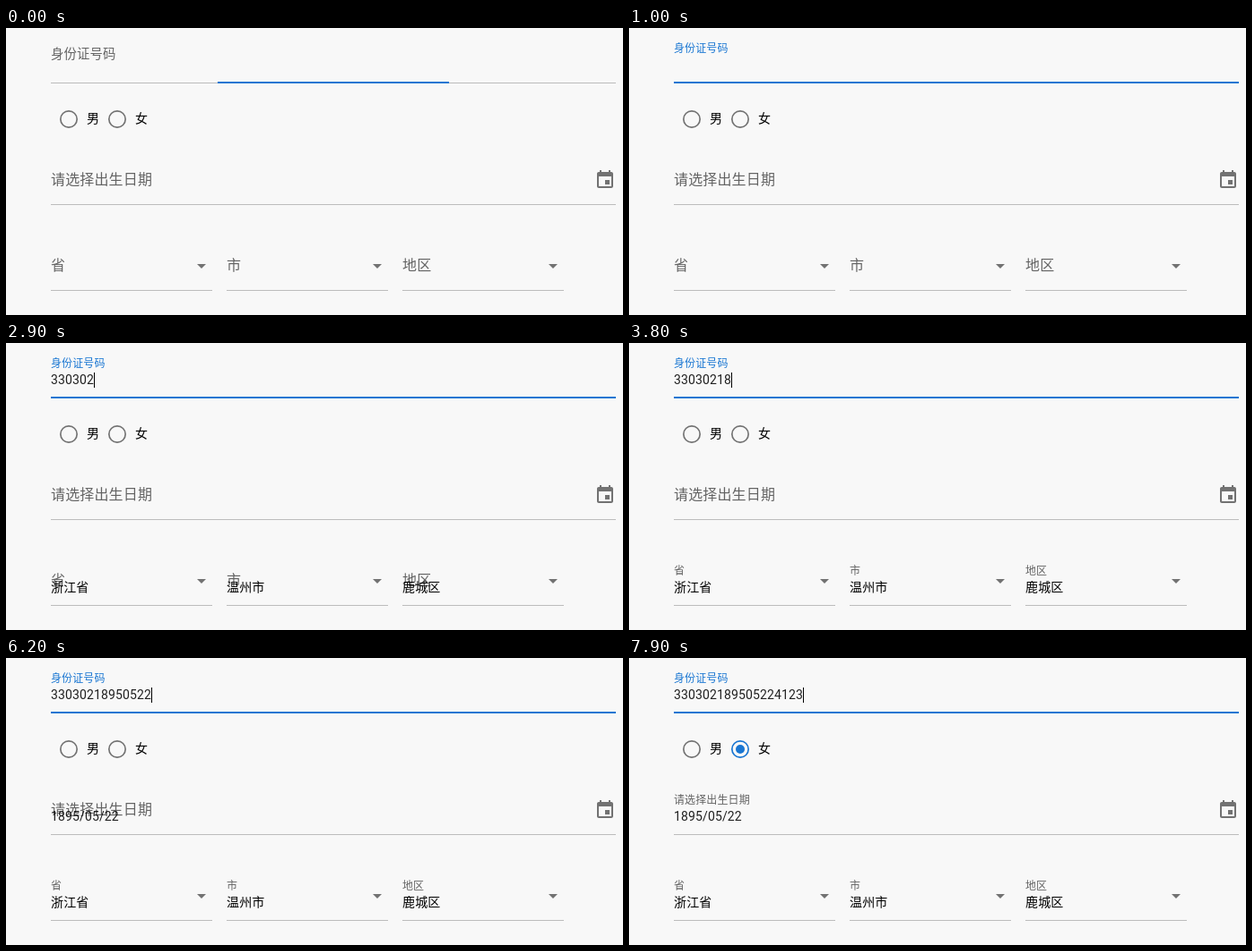
Write an HTML page with a canvas that moves like this. It is 688 by 321 pixels and loops after 8 s.

```html
<!DOCTYPE html>
<html lang="zh-CN">
<head>
<meta charset="utf-8">
<style>
html, body { margin: 0; width: 100%; height: 100%; overflow: hidden; background: #f8f8f8; }
#stage { position: relative; width: 688px; height: 321px; overflow: hidden;
  font-family: Roboto, "Noto Sans CJK SC", "Noto Sans CJK", sans-serif; }
canvas { position: absolute; left: 0; top: 0; }
.text { position: absolute; white-space: nowrap; letter-spacing: .00937em; }
.label { font-size: 16px; line-height: 20px; font-weight: 300; color: rgba(0,0,0,.6); transform-origin: left top; }
.value { font-size: 14px; line-height: 24px; color: rgba(0,0,0,.87); }
.option { font-size: 14px; line-height: 20px; letter-spacing: 0; color: #000; }
.cjk { font-weight: 300; color: #000; }
#caret { position: absolute; width: 1px; height: 17px; background: #000; }
</style>
</head>
<body>
<div id="stage"><canvas></canvas><div id="caret"></div></div>
<script>
const LOOP = 8000, BLUE = '#1976d2', ICON = 'rgba(0,0,0,.54)';
const ID = '330302189505224123';
const KEYS = [1500, 1600, 1800, 1900, 2300, 2900, 3500, 3800, 4100,
  4300, 5000, 5300, 6000, 6200, 7300, 7500, 7700, 7900];
const BLUR = -139, HOVER = 325, FOCUS = 490, CARET = 500;
const REGION = KEYS[5], BIRTH = KEYS[13], GENDER = KEYS[16];

const stage = document.getElementById('stage');
const caret = document.getElementById('caret');
const canvas = document.querySelector('canvas');
const ctx = canvas.getContext('2d');
const dpr = window.devicePixelRatio || 1;
canvas.width = 688 * dpr;
canvas.height = 321 * dpr;
canvas.style.width = '688px';
canvas.style.height = '321px';

function bezier(x1, x2, y1, y2) {
  const at = (a, b, u) => 3 * a * u * (1 - u) ** 2 + 3 * b * u * u * (1 - u) + u ** 3;
  return x => {
    if (x <= 0) return 0;
    if (x >= 1) return 1;
    let lo = 0, hi = 1;
    for (let i = 0; i < 24; i++) {
      const mid = (lo + hi) / 2;
      if (at(x1, x2, mid) < x) lo = mid; else hi = mid;
    }
    return at(y1, y2, lo);
  };
}
const standard = bezier(.4, .2, 0, 1);
const decelerate = bezier(0, .2, 0, 1);
const ease = (t, start) => standard((t - start) / 360);

function addText(kind, text, x, y) {
  const el = document.createElement('div');
  el.className = 'text ' + kind;
  el.textContent = text;
  el.style.left = x + 'px';
  el.style.top = y + 'px';
  stage.appendChild(el);
  return el;
}

// Each field is 56px tall; fillAt is when its value appears.
function addField(x, y, width, label, value, fillAt, kind) {
  return { x, y, width, fillAt,
    label: addText('label', label, x, y + 18),
    value: addText('value ' + kind, value, x, y + 23) };
}
const idField = addField(50, 6, 630, '身份证号码', '', 0, '');
const dateField = addField(50, 142, 630, '请选择出生日期', '1895/05/22', BIRTH, '');
const selects = [['省', '浙江省'], ['市', '温州市'], ['地区', '鹿城区']]
  .map(([label, value], i) => addField(50 + 196 * i, 238, 180, label, value, REGION, 'cjk'));
const autoFields = [dateField, ...selects];
addText('option cjk', '男', 90, 91);
addText('option cjk', '女', 144, 91);

const eventIcon = new Path2D('M17 12h-5v5h5v-5zM16 1v2H8V1H6v2H5c-1.11 0-1.99.9-1.99 2L3 19c0 1.1.89 2 2 2h14c1.1 0 2-.9 2-2V5c0-1.1-.9-2-2-2h-1V1h-2zm3 18H5V8h14v11z');
const arrowIcon = new Path2D('M7 10l5 5 5-5z');

function drawIcon(path, x, y) {
  ctx.save();
  ctx.translate(x, y);
  ctx.fillStyle = ICON;
  ctx.fill(path);
  ctx.restore();
}

function drawLine(f, alpha) {
  ctx.fillStyle = `rgba(0,0,0,${alpha})`;
  ctx.fillRect(f.x, f.y + 55, f.width, 1);
}

function drawRadio(x, y, dot, color) {
  ctx.strokeStyle = ctx.fillStyle = color;
  ctx.lineWidth = 5 / 3;
  ctx.beginPath();
  ctx.arc(x, y, 55 / 6, 0, Math.PI * 2);
  ctx.stroke();
  ctx.beginPath();
  ctx.arc(x, y, 5 * dot, 0, Math.PI * 2);
  ctx.fill();
}

function floatLabel(f, p) {
  f.label.style.transform = p ? `translateY(${-8 * p}px) scale(${1 - p / 4})` : 'none';
}

function render(t) {
  const focused = t >= FOCUS;
  const active = focused ? ease(t, FOCUS) : 1 - ease(t, BLUR);
  const typed = KEYS.filter(k => k <= t).length;

  floatLabel(idField, active);
  idField.label.style.color = focused ? BLUE : '';
  idField.value.textContent = ID.slice(0, typed);
  for (const f of autoFields) {
    floatLabel(f, ease(t, f.fillAt));
    f.value.style.visibility = t >= f.fillAt ? 'visible' : 'hidden';
  }

  const since = t - (typed ? KEYS[typed - 1] : CARET);
  const lit = since >= 0 && Math.floor(since / 500) % 2 === 0;
  caret.style.visibility = lit ? 'visible' : 'hidden';
  caret.style.left = 50 + 8 * typed + 'px';
  caret.style.top = (typed ? 33 : 34) + 'px';

  ctx.setTransform(dpr, 0, 0, dpr, 0, 0);
  ctx.clearRect(0, 0, 688, 321);
  drawLine(idField, .24 + .76 * ease(t, HOVER));
  autoFields.forEach(f => drawLine(f, .24));
  ctx.fillStyle = BLUE;
  ctx.fillRect(365 - 315 * active, 60, 630 * active, 2);

  const chosen = t >= GENDER;
  drawRadio(70, 102, 0, ICON);
  drawRadio(124, 102, decelerate((t - GENDER) / 220), chosen ? BLUE : ICON);
  drawIcon(eventIcon, 656, 158);
  selects.forEach(f => drawIcon(arrowIcon, f.x + 156, 254));
}

const begin = performance.now();
function tick() {
  render((performance.now() - begin) % LOOP);
  requestAnimationFrame(tick);
}
render(0);
requestAnimationFrame(tick);
</script>
</body>
</html>
```
